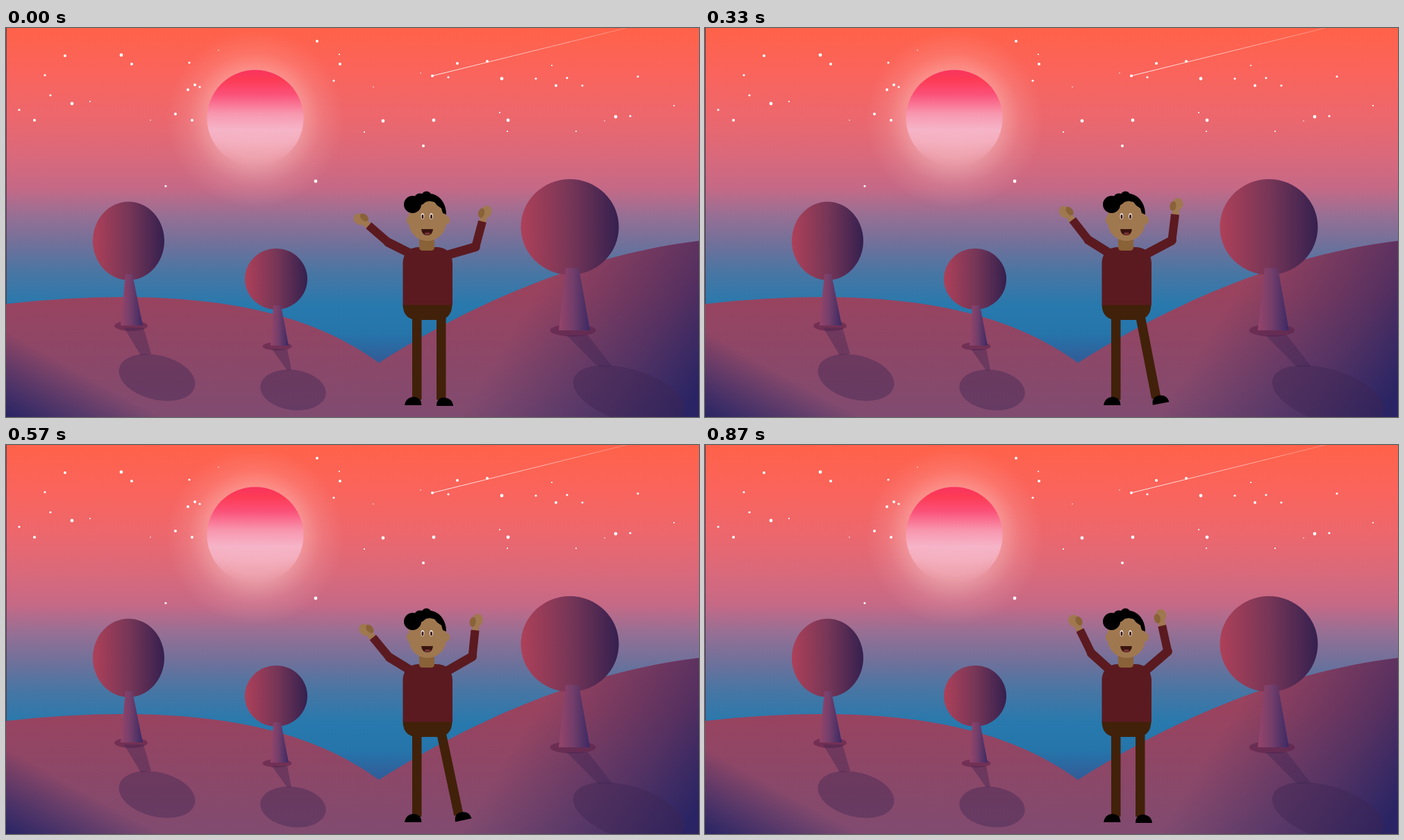
Write an HTML page that moves like this. It is 998 by 561 pixels and loops after 0.9 s.

```html
<!DOCTYPE html>
<html lang="en">
<head>
<meta charset="utf-8">
<title>Sunset dance</title>
<style>
  html, body { margin: 0; width: 100%; height: 100%; overflow: hidden; }
  svg { display: block; width: 100vw; height: 100vh; }
</style>
</head>
<body>
<svg viewBox="0 0 998 561">
  <defs>
    <linearGradient id="sky" gradientUnits="userSpaceOnUse" x1="0" y1="0" x2="0" y2="500">
      <stop offset="0" stop-color="#ff6249"/>
      <stop offset=".13" stop-color="#fa645c"/>
      <stop offset=".26" stop-color="#ec676d"/>
      <stop offset=".37" stop-color="#d9697b"/>
      <stop offset=".46" stop-color="#c66986"/>
      <stop offset=".54" stop-color="#986f94"/>
      <stop offset=".63" stop-color="#6d719b"/>
      <stop offset=".71" stop-color="#4776a4"/>
      <stop offset=".8" stop-color="#2879ad"/>
      <stop offset=".88" stop-color="#2575ab"/>
      <stop offset="1" stop-color="#38508f"/>
    </linearGradient>
    <radialGradient id="glow" gradientUnits="userSpaceOnUse" cx="359" cy="132" r="128">
      <stop offset="0" stop-color="#ffdce0" stop-opacity=".65"/>
      <stop offset=".42" stop-color="#ffd8d8" stop-opacity=".52"/>
      <stop offset=".58" stop-color="#ffd2d0" stop-opacity=".36"/>
      <stop offset=".75" stop-color="#ffc8c8" stop-opacity=".16"/>
      <stop offset="1" stop-color="#ffc0c0" stop-opacity="0"/>
    </radialGradient>
    <linearGradient id="sun" x2="0" y2="1">
      <stop offset="0" stop-color="#f8345f"/>
      <stop offset=".1" stop-color="#fd3b55"/>
      <stop offset=".25" stop-color="#fb5078"/>
      <stop offset=".45" stop-color="#f896ae"/>
      <stop offset=".62" stop-color="#f6b4c8"/>
      <stop offset=".75" stop-color="#f5b2c4" stop-opacity=".8"/>
      <stop offset="1" stop-color="#f0a0b0" stop-opacity="0"/>
    </linearGradient>
    <linearGradient id="trail" gradientUnits="userSpaceOnUse" x1="614" y1="69" x2="893" y2="0">
      <stop offset="0" stop-color="#fff" stop-opacity=".9"/>
      <stop offset="1" stop-color="#fff" stop-opacity=".25"/>
    </linearGradient>
    <linearGradient id="ground" gradientUnits="userSpaceOnUse" x1="0" y1="385" x2="0" y2="561">
      <stop offset="0" stop-color="#99435f"/>
      <stop offset="1" stop-color="#804b70"/>
    </linearGradient>
    <linearGradient id="duskLeft" gradientUnits="userSpaceOnUse" x1="0" y1="437" x2="-53" y2="533">
      <stop offset="0" stop-color="#282464" stop-opacity="0"/>
      <stop offset="1" stop-color="#282464"/>
    </linearGradient>
    <linearGradient id="duskRight" gradientUnits="userSpaceOnUse" x1="722" y1="450" x2="952" y2="594">
      <stop offset="0" stop-color="#2c2460" stop-opacity="0"/>
      <stop offset=".65" stop-color="#2c2460" stop-opacity=".6"/>
      <stop offset="1" stop-color="#2a2464"/>
    </linearGradient>
    <linearGradient id="crown">
      <stop offset="0" stop-color="#ae4059"/>
      <stop offset=".5" stop-color="#773657"/>
      <stop offset="1" stop-color="#35204f"/>
    </linearGradient>
    <linearGradient id="trunk">
      <stop offset="0" stop-color="#96446a"/>
      <stop offset=".45" stop-color="#733e6a"/>
      <stop offset="1" stop-color="#3a2964"/>
    </linearGradient>
    <path id="hills" d="M0 398C150 381 280 386 375 410C445 427 498 454 537 483C652 409 820 328 998 307V561H0Z"/>
  </defs>

  <rect width="998" height="561" fill="url(#sky)"/>
  <circle cx="359" cy="132" r="128" fill="url(#glow)"/>
  <circle cx="359" cy="130" r="69.5" fill="url(#sun)"/>
  <path d="M614 69L893 0" stroke="url(#trail)"/>
  <g id="stars" fill="#fff"/>
  <path d="M.5 0V398" stroke="#4a3048" stroke-opacity=".8"/>
  <use href="#hills" fill="url(#ground)"/>
  <use href="#hills" fill="url(#duskLeft)"/>
  <use href="#hills" fill="url(#duskRight)"/>
  <g id="trees"/>

  <g id="man">
    <g id="arms"/>
    <g fill="#412109">
      <rect x="585" y="412" width="13.5" height="124"/>
      <path fill="#000" d="M574 544Q576 532 588 532Q598 533 598.5 544Z"/>
      <g id="leg">
        <rect x="620" y="412" width="13.5" height="124"/>
        <path fill="#000" d="M620 545Q620 533 631 533Q643 534 644 545Z"/>
      </g>
      <path d="M571.5 399H642.5Q642 421 620 421H594Q572 421 571.5 399Z"/>
    </g>
    <path fill="#5b1a20" d="M571.5 399.500V338Q573 316 596 316H619Q641 316 643 338V399.500Z"/>
    <path fill="#8a6238" d="M595 300H617V316Q617 321 612 321H600Q595 321 595 316Z"/>
    <g fill="#a0784f">
      <ellipse cx="580.500" cy="277" rx="3.500" ry="6"/>
      <ellipse cx="635.500" cy="277" rx="3.500" ry="6"/>
      <path d="M580 269C580 238 634 238 634 269V279C634 297 620 307 607 307C594 307 580 297 580 279Z"/>
    </g>
    <path d="M598 241C618 233 634 248 634 269L629 267L627 260L621 256L617 251L607 249L597 256L589 263Z"/>
    <circle cx="585.500" cy="254.500" r="12.500"/>
    <circle cx="596" cy="247" r="8.500"/>
    <circle cx="605.500" cy="243" r="7.500"/>
    <g fill="#fff">
      <ellipse cx="600" cy="271.500" rx="2.300" ry="4.200"/>
      <ellipse cx="612.500" cy="271.500" rx="2.300" ry="4.200"/>
    </g>
    <g fill="#3a1410">
      <ellipse cx="600" cy="272" rx="1.500" ry="3.200"/>
      <ellipse cx="612.500" cy="272" rx="1.500" ry="3.200"/>
      <path d="M598 290H615Q614 299 607 299Q599 299 598 290Z"/>
    </g>
    <ellipse cx="607" cy="296.500" rx="4" ry="1.800" fill="#7a3436"/>
  </g>
</svg>
<script>
const byId = id => document.getElementById(id);

// Star positions grouped by radius
const stars = {
  2.4: "95,109 446,221 543,134 616,133 723,133 878,128 166,39 714,73",
  2: "85,40 181,52 41,133 272,82 262,89 244,124 268,133 448,19 481,52 614,69 650,51 693,48 601,170 792,83",
  1.6: "56,68 64,97 19,118 264,50 279,85 230,228 472,76 637,71 763,73 808,72 830,83 899,127 910,70",
  1.1: "121,106 480,38 516,150 711,122 722,149 786,54 821,149 962,112",
  .8: "306,32 208,133 529,85 597,65 862,134"
};
byId("stars").innerHTML = Object.entries(stars).map(([r, list]) =>
  list.split(" ").map(p => {
    const [x, y] = p.split(",");
    return `<circle cx="${x}" cy="${y}" r="${r}"/>`;
  }).join("")).join("");

const ellipse = (cx, cy, rx, ry, extra = "") =>
  `<ellipse cx="${cx}" cy="${cy}" rx="${rx}" ry="${ry}" ${extra}/>`;

function tree(crown, trunk, base, ray, shade, tilt) {
  return `<g fill="#3c2350" fill-opacity=".4">
      ${ellipse(...base, 'fill="#5a2048" fill-opacity=".55"')}
      <path d="${ray}"/>
      ${ellipse(...shade, `transform="rotate(${tilt} ${shade[0]} ${shade[1]})"`)}
    </g>
    ${ellipse(...crown, 'fill="url(#crown)"')}
    <path d="${trunk}" fill="url(#trunk)"/>`;
}
byId("trees").innerHTML =
  tree([176.5, 307, 51.5, 56.5], "M172 355H182L197 429H165Z", [180, 429.5, 24, 7.5],
    "M170 432H198L209 470L194 472Z", [217.5, 504, 56, 32], 14) +
  tree([389, 362, 45, 44], "M385 400H396L407 458H381Z", [390.5, 459, 21, 6],
    "M383 463H405L411 493L405 494Z", [413.5, 522, 47.5, 29], 8) +
  tree([812, 287, 70.5, 69], "M806 346H825L841 436H796Z", [816.5, 436, 33, 9],
    "M807 443H838L873 488L853 489Z", [897, 530, 83, 38], 17);

// Arms point straight up at 0 degrees; the left one is mirrored
const arm = (name, x, y, side, upper, fore) => `
  <g transform="translate(${x} ${y}) scale(${side} 1)"><g id="${name}Upper">
    <path d="M0 0V${-upper}" stroke="#5b1a20" stroke-width="13" stroke-linecap="round"/>
    <g transform="translate(0 ${-upper})"><g id="${name}Fore">
      <path d="M.5 ${2 - fore}V-50" stroke="#a0784f" stroke-width="9.500"/>
      ${ellipse(2, -53, 7.5, 9, 'fill="#a0784f"')}
      ${ellipse(-4.5, -49.5, 4.5, 7, 'fill="#8a6238"')}
      <path d="M0 0V${-fore}" stroke="#5b1a20" stroke-width="12"/>
    </g></g>
  </g></g>`;
byId("arms").innerHTML = arm("left", 586, 327, -1, 40, 37) + arm("right", 630, 329, 1, 48, 38);

const times = [0, 210, 330, 450, 570, 690, 870];
const poses = {
  leftUpper: [63.4, 59, 58, 56, 58.5, 60, 48],
  leftFore: [49, 41.6, 38, 35, 39.5, 42.5, 26],
  rightUpper: [74, 59, 62, 69.5, 60, 58.5, 49.3],
  rightFore: [15, 5.5, 7, 11, 6, 2, -12.5],
  leg: [0, -12.2, -11, -12.6, -12, -12.6, 0]
};

function sample(values, t) {
  let i = 0;
  while (i < times.length - 2 && t >= times[i + 1]) i++;
  const k = (t - times[i]) / (times[i + 1] - times[i]);
  return values[i] + (values[i + 1] - values[i]) * k;
}

const rotate = (id, angle, pivot = "") =>
  byId(id).setAttribute("transform", `rotate(${angle} ${pivot})`);

function draw(now) {
  const t = Math.floor(now % 900 / 30) * 30;
  const at = name => sample(poses[name], t);
  for (const side of ["left", "right"]) {
    const upper = at(side + "Upper");
    rotate(side + "Upper", upper);
    rotate(side + "Fore", at(side + "Fore") - upper);
  }
  rotate("leg", at("leg"), "626.5 415");
}

let start;
function tick(now) {
  start ??= now;
  draw(now - start);
  requestAnimationFrame(tick);
}
draw(0);
requestAnimationFrame(tick);
</script>
</body>
</html>
```
